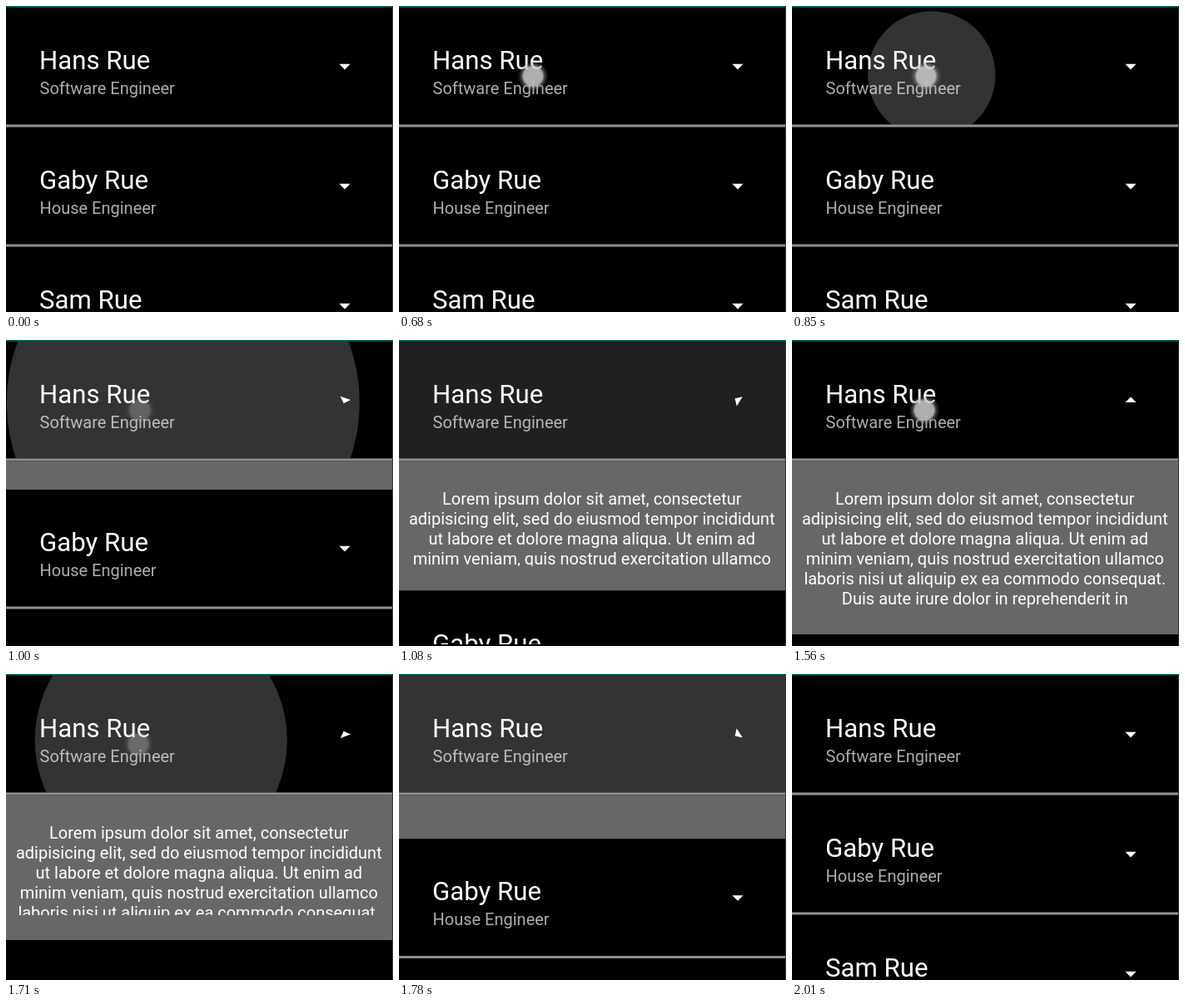
Animation, 465 px wide and 368 px high, one loop 2.42 s. Source, as an HTML page:

```html
<!DOCTYPE html>
<html lang="en">
<head>
<meta charset="utf-8">
<title>Expandable list</title>
<style>
  html, body { margin: 0; width: 100%; height: 100%; overflow: hidden; background: #000; }
  svg { display: block; width: 465px; height: 368px; font-family: Roboto, sans-serif; }
  .name { font-size: 31.2px; fill: #fff; }
  .job { font-size: 20px; fill: #fff; fill-opacity: .68; }
  .body { font-size: 20px; fill: #fff; text-anchor: middle; }
  .line { fill: #929192; }
</style>
</head>
<body>
<svg viewBox="0 0 465 368">
  <defs>
    <clipPath id="screen"><rect width="464" height="366"/></clipPath>
    <clipPath id="head"><rect y="2" width="464" height="140.5"/></clipPath>
    <clipPath id="textBox"><rect id="textClip" y="176" width="464" height="0"/></clipPath>
    <radialGradient id="glow">
      <stop offset="0" stop-color="#cfcdcf" stop-opacity=".86"/>
      <stop offset=".6" stop-color="#cfcdcf" stop-opacity=".84"/>
      <stop offset=".74" stop-color="#999" stop-opacity=".42"/>
      <stop offset="1" stop-color="#555" stop-opacity="0"/>
    </radialGradient>
  </defs>
  <rect width="465" height="368"/>
  <rect x="464" width="1" height="368" fill="#303030"/>
  <g clip-path="url(#screen)">
    <g clip-path="url(#head)"><circle id="ripple" fill="#333"/></g>
    <g id="first"></g>
    <rect id="panel" y="145.5" width="464" fill="#676668"/>
    <g id="copy" clip-path="url(#textBox)"></g>
    <g id="rest"><rect y="146" width="464" height="400"/></g>
    <rect width="464" height="1.7" fill="#00695c"/>
    <circle id="dot" cy="84.5" r="19" fill="url(#glow)"/>
  </g>
</svg>
<script>
const $ = id => document.getElementById(id);
const LOOP = 2420, PANEL = 208, PAD = 32, MOVE = 200;
const COPY = [
  'Lorem ipsum dolor sit amet, consectetur',
  'adipisicing elit, sed do eiusmod tempor incididunt',
  'ut labore et dolore magna aliqua. Ut enim ad',
  'minim veniam, quis nostrud exercitation ullamco',
  'laboris nisi ut aliquip ex ea commodo consequat.',
  'Duis aute irure dolor in reprehenderit in'
];

// The screen refreshes only at these moments.
const STEPS = [0, 680, 780, 850, 930, 1000, 1080, 1160,
               1560, 1630, 1700, 1780, 1860, 1930, 2010];

const TAPS = [
  { x: 161, down: 680, lift: [930, 1040], grow: [765, 1040], fade: [1040, 1150] },
  { x: 159, down: 1560, lift: [1630, 1750], grow: [1590, 1770], fade: [1790, 1990] }
];

const row = (i, name, job) => `<g transform="translate(0 ${i * 144})">
  <rect class="line" y="142.5" width="464" height="3"/>
  <text class="name" x="40" y="76">${name}</text>
  <text class="job" x="40.5" y="106">${job}</text>
  <path class="arrow" d="M-6.6-2.7H6.6L0 4z" fill="#fff" transform="translate(407 72.4)"/>
</g>`;

$('first').innerHTML = row(0, 'Hans Rue', 'Software Engineer');
$('rest').innerHTML += row(1, 'Gaby Rue', 'House Engineer') + row(2, 'Sam Rue', '');
$('copy').innerHTML = COPY.map((s, i) =>
  `<text class="body" x="231.8" y="${198 + i * 24}">${s}</text>`).join('');
const arrow = document.querySelector('#first .arrow');

const ramp = (t, a, b) => Math.min(1, Math.max(0, (t - a) / (b - a)));
const ease = (t, start) => .5 - .5 * Math.cos(Math.PI * ramp(t, start, start + MOVE));
const openness = (t, up, down) => ease(t, up) - ease(t, down);

function set(id, attrs) {
  for (const k in attrs) $(id).setAttribute(k, attrs[k]);
}

function draw(t) {
  const h = PANEL * openness(t, 947, 1647);
  const turn = 180 * openness(t, 957, 1656);
  set('panel', { height: h + .5 });
  set('textClip', { height: Math.max(0, h - 2 * PAD + 4) });
  set('rest', { transform: `translate(0 ${h})` });
  arrow.setAttribute('transform', `translate(407 72.4) rotate(${turn})`);

  const tap = TAPS[t < 1560 ? 0 : 1];
  const p = ramp(t, ...tap.grow);
  const shift = p ** 2;
  set('ripple', {
    cx: tap.x + (232 - tap.x) * shift,
    cy: 84 - 12 * shift,
    r: 248 * p,
    opacity: 1 - ramp(t, ...tap.fade)
  });
  set('dot', { cx: tap.x, opacity: t < tap.down ? 0 : 1 - ramp(t, ...tap.lift) });
}

const origin = performance.now();
let shown = -1;
function tick() {
  const now = (performance.now() - origin) % LOOP;
  const t = STEPS.filter(s => s <= now).pop();
  if (t !== shown) draw(shown = t);
  requestAnimationFrame(tick);
}
tick();
</script>
</body>
</html>
```
